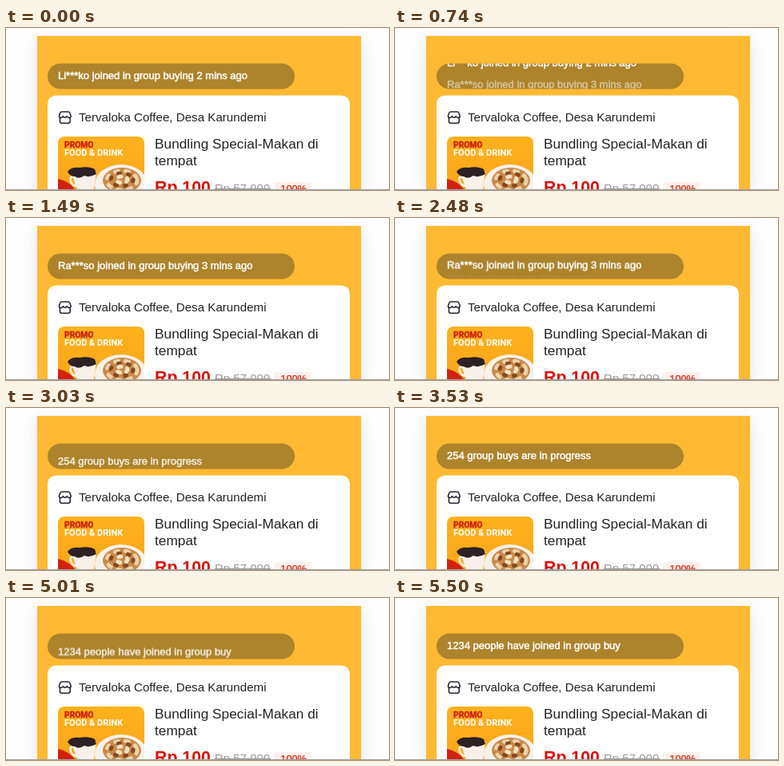
Recreate the animation shown at these times as an HTML page. Size 479 px wide and 203 px high, loop 5700 ms.

```html
<!DOCTYPE html>
<html lang="id">
<head>
<meta charset="utf-8">
<title>Group buying ticker</title>
<style>
  html, body { margin: 0; width: 100%; height: 100%; overflow: hidden; background: #fdfdfd; }
  .stage { position: relative; width: 100%; height: 100%; max-height: 203px; overflow: hidden; contain: strict; }
  .panel {
    position: absolute; left: 39px; top: 10px; width: 405px; bottom: 0;
    background: #ffb933;
    box-shadow: 0 0 1px rgba(0, 0, 0, .15), 0 7px 20px rgba(0, 0, 0, .1);
  }
  svg { position: absolute; left: 0; top: 0; display: block; }
  text { font-family: "Liberation Sans", Arial, sans-serif; white-space: pre; }
  .promo text { font-family: Roboto, sans-serif; font-weight: 700; }

  .ticker text {
    font-size: 13px; fill: #fff; stroke: #fff; stroke-width: .5px;
    animation: 5700ms linear infinite;
  }
  .ticker .m0 { animation-name: m0; }
  .ticker .m1 { animation-name: m1; }
  .ticker .m2 { animation-name: m2; }
  .ticker .m3 { animation-name: m3; }

  /* Each line drifts in from below at a steady pace and eases out upwards. */
  @keyframes m0 {
    0%, 7.3% { transform: none; animation-timing-function: ease; }
    25.6%, 100% { transform: translateY(-30px); }
  }
  @keyframes m1 {
    0%, 7.3% { transform: translateY(16px); opacity: 0; }
    16.5% { opacity: .85; }
    25.6%, 42.8% { transform: none; opacity: 1; animation-timing-function: ease; }
    61.2%, 100% { transform: translateY(-30px); }
  }
  @keyframes m2 {
    0%, 42.8% { transform: translateY(16px); opacity: 0; }
    52% { opacity: .85; }
    61.2%, 78.6% { transform: none; opacity: 1; animation-timing-function: ease; }
    96.5%, 100% { transform: translateY(-30px); }
  }
  @keyframes m3 {
    0%, 78.6% { transform: translateY(16px); opacity: 0; }
    87.5% { opacity: .85; }
    96.5%, 100% { transform: none; opacity: 1; }
  }
</style>
</head>
<body>
<div class="stage">
<div class="panel"></div>
<svg width="479" height="203" viewBox="0 0 479 203">
  <defs>
    <clipPath id="pill"><rect x="52" y="44.5" width="309" height="32" rx="16"/></clipPath>
    <clipPath id="photo"><rect x="65" y="136" width="108" height="67" rx="8"/><rect x="65" y="150" width="108" height="53"/></clipPath>
    <linearGradient id="amber" x2="0" y2="1">
      <stop offset="0" stop-color="#fdb21c"/>
      <stop offset="1" stop-color="#faa51a"/>
    </linearGradient>
  </defs>

  <rect x="52" y="44.5" width="309" height="32" rx="16" fill="#ad832b"/>
  <g class="ticker" clip-path="url(#pill)">
    <text class="m0" x="65" y="64">Li***ko joined in group buying 2 mins ago</text>
    <text class="m1" x="65" y="64">Ra***so joined in group buying 3 mins ago</text>
    <text class="m2" x="65" y="64">254 group buys are in progress</text>
    <text class="m3" x="65" y="64">1234 people have joined in group buy</text>
  </g>

  <path d="M52 203V96.500q0-12 12-12h354q12 0 12 12V203z" fill="#fff"/>

  <g fill="none" stroke="#2b2536" stroke-width="1.6" stroke-linejoin="round" stroke-linecap="round">
    <path d="M69.800 105h8q1.600 0 2.100 1.600l1.300 3.600c0 2.800-4.200 2.800-4.900.4-.9 2.200-4.100 2.200-5 0-.7 2.400-4.900 2.400-4.900-.4l1.300-3.600q.5-1.600 2.100-1.600z"/>
    <path d="M67.400 112.800v4.200q0 2.200 2.200 2.200h8.400q2.200 0 2.200-2.200v-4.200"/>
  </g>
  <text x="91" y="117" font-size="15.15" fill="#222">Tervaloka Coffee, Desa Karundemi</text>

  <g class="promo" clip-path="url(#photo)">
    <rect x="65" y="136" width="108" height="67" fill="url(#amber)"/>
    <path d="M65 189q14 3 22 14h-22z" fill="#d3200f"/>
    <text x="73" y="150" font-size="10.3" fill="#cf1d12" stroke="#cf1d12" stroke-width=".4">PROMO</text>
    <text x="73" y="160" font-size="11" fill="#fff">FOOD &amp; DRINK</text>

    <g fill="#f7f1ea">
      <path d="M82 182l31-2-3 23h-21z"/>
      <path d="M86 187q-7-2-5 5 2 6 8 6" fill="none" stroke="#f7f1ea" stroke-width="2.500"/>
      <ellipse cx="144" cy="196" rx="33" ry="25"/>
    </g>
    <path d="M77 180q4-6 15-5 12-2 19 2l2 6q-9 5-15 2-7 5-12 1-6 0-9-6z" fill="#2c2124"/>

    <ellipse cx="145" cy="191" rx="24" ry="16" fill="#c98a4b"/>
    <g fill="none" stroke-width="5" stroke-linecap="round">
      <ellipse cx="145" cy="191" rx="19" ry="12" stroke="#ecd3a8" stroke-dasharray="4 9"/>
      <ellipse cx="145" cy="190" rx="14" ry="8" stroke="#86491f" stroke-dasharray="2 10"/>
      <ellipse cx="145" cy="190" rx="7" ry="4" stroke="#f3e2c2" stroke-dasharray="3 8"/>
    </g>
  </g>

  <g font-size="17.3" fill="#222">
    <text x="186" y="151">Bundling Special-Makan di</text>
    <text x="186" y="172">tempat</text>
  </g>

  <text x="186" y="207" font-size="21.3" font-weight="700" fill="#d8140c">Rp 100</text>
  <text x="261" y="206" font-size="15" fill="#999">Rp 57.000</text>
  <path d="M261 201.5h70" stroke="#999"/>
  <path d="M335 203v-8q0-2 2-2h43q2 0 2 2v8z" fill="#fff1ee"/>
  <text x="339" y="205.500" font-size="12.8" fill="#e0200c" stroke="#e0200c" stroke-width=".25">-100%</text>

  <rect y="202" width="479" height="1" fill="#a0a0a0"/>
</svg>
</div>
</body>
</html>
```
